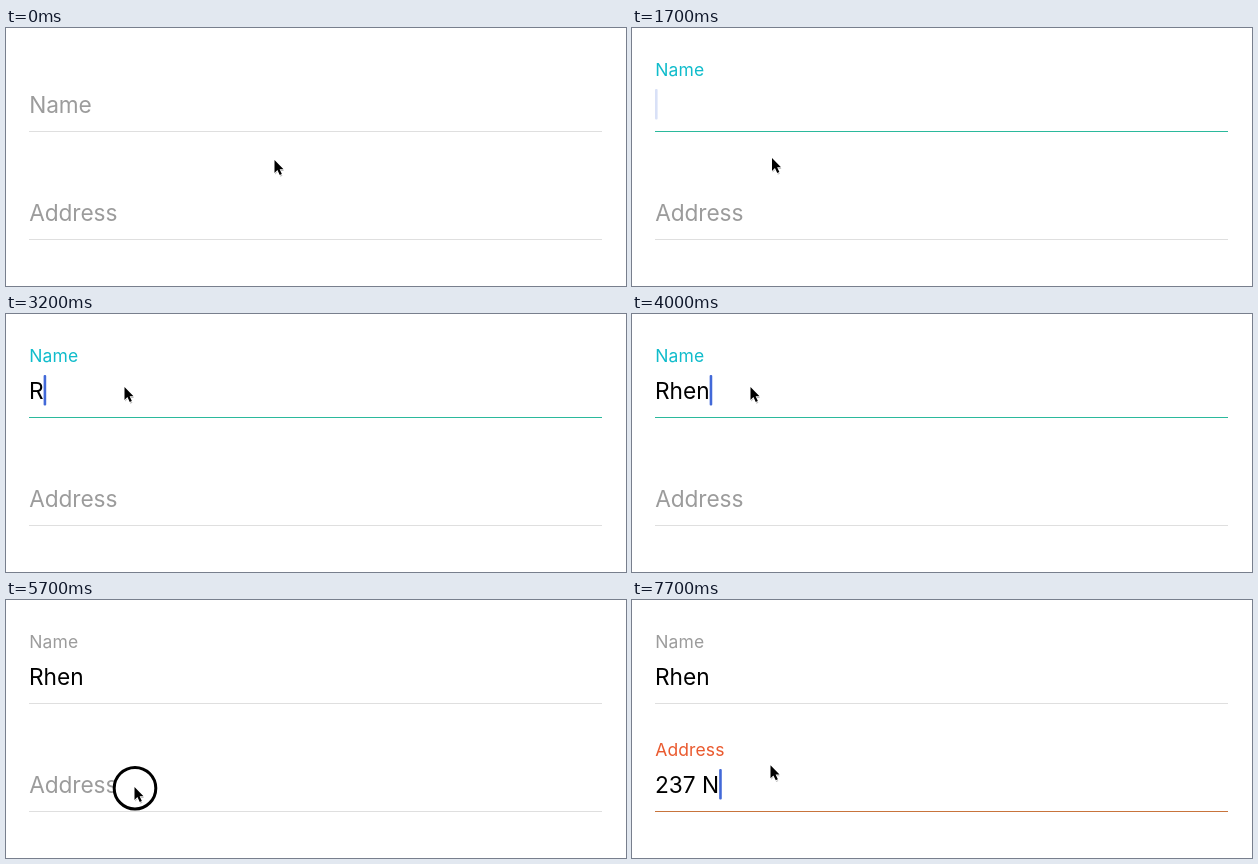
Write an HTML page that moves like this. It is 620 px wide and 258 px high and loops after 8000 ms.

```html
<!DOCTYPE html>
<html lang="en">
<head>
<meta charset="utf-8">
<title>Floating labels</title>
<style>
  html, body { margin: 0; width: 100%; height: 100%; overflow: hidden; background: #fff; }
  svg { display: block; width: 620px; height: 258px; }
  text { font-family: Inter, "Open Sans", sans-serif; white-space: pre; }
</style>
</head>
<body>
<svg id="stage" viewBox="0 0 620 258">
  <defs><path id="arrow" d="M0 0V14L3.2 11L5.7 16.3L8 15.2L5.6 10.1H9.8Z"/></defs>
  <g id="pointer">
    <circle id="ring" cx=".5" cy="1.2" r="20.8" fill="#fff" stroke="#000" stroke-width="3"/>
    <g transform="scale(.92)">
      <use href="#arrow" opacity=".25" x=".6" y="1.8"/>
      <use href="#arrow" stroke="#fff" stroke-width="1.6" paint-order="stroke"/>
    </g>
  </g>
</svg>
<script>
const LOOP = 8000, STEP = 100;
const LEFT = 23, RIGHT = 596, CENTER = (LEFT + RIGHT) / 2;
const BIG = 22.7, SMALL = 17.5, LIFT = 37;
const GRAY = '#9c9c9c';
const stage = document.getElementById('stage');
const pointer = document.getElementById('pointer');
const ring = document.getElementById('ring');

// focus: pairs of taps that open and close the field; keys: time of each keystroke
const fields = [
  { label: 'Name', base: 85, tint: '#10bccb', line: '#2bb99c',
    focus: [[1000, 1800], [2400, 4900]], entry: 'Rhen', keys: [3200, 3400, 3500, 3800] },
  { label: 'Address', base: 193, tint: '#ea5a2f', line: '#c8743c',
    focus: [[5700, Infinity]], entry: '237 N', keys: [6900, 7000, 7300, 7600, 7700] }
];
const taps = fields.flatMap(f => f.focus.flat());

// pointer moves: from, until, x, y
const home = [268.5, 132];
const moves = [
  [0, 500, 66, 173], [500, 800, 102.5, 75.5],
  [1300, 1700, 140, 130], [1900, 2200, 118.5, 81.5], [2500, 2700, 118.5, 73],
  [4300, 4800, 182.5, 152], [4800, 4900, 186, 210], [4900, 5400, 128.5, 187],
  [5700, 6100, 138.5, 165.3]
];

const mix = (a, b, p) => a + (b - a) * p;
const clamp = x => Math.min(1, Math.max(0, x));
const easeOut = x => 1 - (1 - clamp(x)) ** 3;
const smooth = x => clamp(x) ** 2 * (3 - 2 * clamp(x));

function set(el, attrs) {
  for (const k in attrs) el.setAttribute(k, attrs[k]);
}

function add(tag, attrs) {
  const el = document.createElementNS('http://www.w3.org/2000/svg', tag);
  set(el, attrs);
  stage.insertBefore(el, pointer);
  return el;
}

for (const f of fields) {
  const rule = { y: f.base + 18, height: 1 };
  add('rect', { ...rule, x: LEFT, width: RIGHT - LEFT, fill: '#dfdfdf' });
  f.bar = add('rect', { ...rule, fill: f.line });
  f.tag = add('text', { x: LEFT + 0.2 });
  f.tag.textContent = f.label;
  f.value = add('text', { x: LEFT, y: f.base, 'font-size': BIG });
  f.caret = add('rect', { y: f.base - 24, width: 2.6, height: 30.5, rx: 1, fill: '#4269d8' });
}

// solid for half a second, then a one-second blink with soft edges
function caretAlpha(age) {
  if (age < 0) return 0;
  if (age < 500) return 1;
  const phase = age % 1000;
  return phase < 500 ? clamp(0.08 + phase / 200) : clamp(0.6 - (phase - 500) / 250);
}

function drawField(f, t) {
  const [on, off] = f.focus.findLast(s => t > s[0]) || [Infinity, Infinity];
  const focused = t > on && t <= off;
  const count = f.keys.filter(k => t >= k).length;
  const open = easeOut((t - on - 45) / 100) * (1 - easeOut((t - off - 45) / 200));
  const lift = count ? 1 : open;
  const half = (RIGHT - LEFT) / 2 * open;

  set(f.tag, {
    y: mix(f.base, f.base - LIFT, lift),
    'font-size': mix(BIG, SMALL, lift),
    'letter-spacing': mix(-0.1, 0.12, lift),
    fill: focused ? f.tint : GRAY
  });
  set(f.bar, { x: CENTER - half, width: half * 2 });
  f.value.textContent = f.entry.slice(0, count);
  const width = count ? f.value.getComputedTextLength() : 0;
  const since = Math.max(on + STEP, count ? f.keys[count - 1] : 0);
  set(f.caret, { x: LEFT + width, opacity: focused ? caretAlpha(t - since) : 0 });
}

function pointerAt(t) {
  let [x, y] = home;
  for (const [from, until, toX, toY] of moves) {
    const p = smooth((t - from) / (until - from));
    x = mix(x, toX, p);
    y = mix(y, toY, p);
  }
  return [x, y];
}

// the screen refreshes ten times a second
function draw(time) {
  const t = Math.floor(time % LOOP / STEP) * STEP;
  for (const f of fields) drawField(f, t);
  set(pointer, { transform: `translate(${pointerAt(t)})` });
  set(ring, { visibility: taps.includes(t) ? 'visible' : 'hidden' });
}

const start = performance.now();
function tick() {
  draw(performance.now() - start);
  requestAnimationFrame(tick);
}
tick();
</script>
</body>
</html>
```
